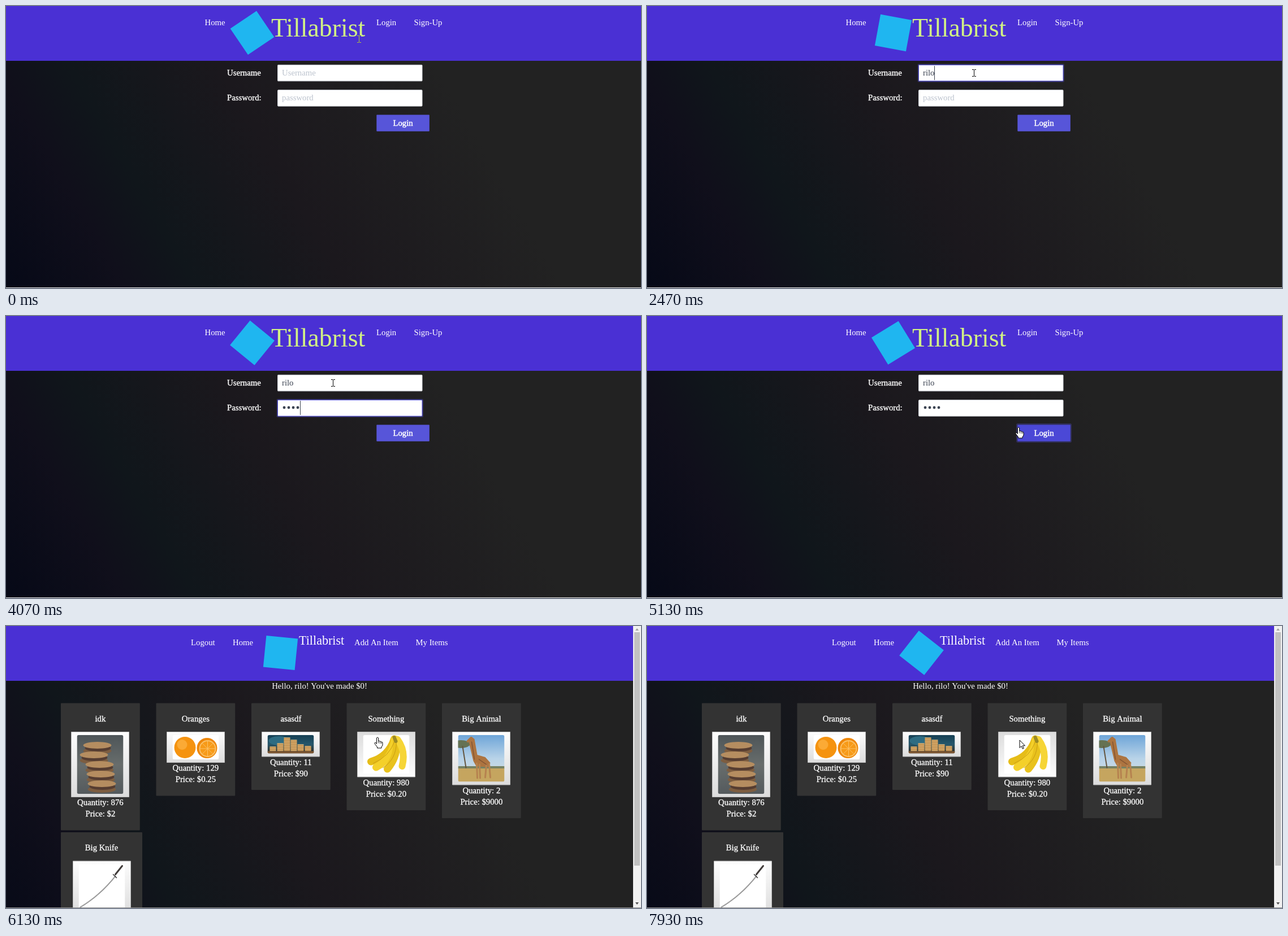
Animation of 1123 by 499 pixels, one loop 8 s. Source, as an HTML page with a canvas:

```html
<!DOCTYPE html>
<html lang="en">
<head>
<meta charset="utf-8">
<title>Marketplace login</title>
<style>
html, body { margin: 0; width: 100%; height: 100%; overflow: hidden; background: #222; }
canvas { display: block; }
</style>
</head>
<body>
<canvas id="stage" width="1123" height="499"></canvas>
<script>
const ctx = document.getElementById('stage').getContext('2d');
const W = 1123, H = 499, LOOP = 8000;
const SERIF = '"Liberation Serif", "Times New Roman", serif';
const BRAND = 'Tillabrist', USER = 'rilo';
const FOCUS_NAME = 1130, FOCUS_PASS = 2930, PRESS = 5070, PAGE = 5470, LOADED = 5930;
const NAME_KEYS = [1930, 2070, 2140, 2270];
const PASS_KEYS = [3600, 3730, 3800, 3930];
const POINTER = [
  [0, 624, 58], [270, 624, 58], [800, 578, 118], [4200, 578, 118],
  [4380, 606, 152], [4800, 657, 197], [6200, 657, 197], [6700, 662, 43],
  [7250, 662, 43], [7700, 659, 202], [LOOP, 659, 202]
];
const HAND = new Path2D('M-1.6 1Q0-1.2 1.6 1V6.5Q3.2 5.6 4.3 7.2Q6 6.5 6.8 8.2Q9 7.8 9 10V14L7 17V19H-.5V17L-4.8 11.5Q-5.6 9.6-4.2 9.2Q-3 9-1.6 11.5Z');
const ARROW = new Path2D('M0 0V13.5L3.1 10.6L5.2 15.3L7.3 14.4L5.2 9.8H9.5Z');

function box(x, y, w, h, fill, r = 0, line) {
  ctx.beginPath();
  ctx.roundRect(x, y, w, h, r);
  if (fill) { ctx.fillStyle = fill; ctx.fill(); }
  if (line) { ctx.strokeStyle = line; ctx.lineWidth = 1; ctx.stroke(); }
}

function text(s, x, y, { size = 14.75, color = '#fff', align = 'left', heavy = 0, font = SERIF } = {}) {
  ctx.font = `${size}px ${font}`;
  ctx.textAlign = align;
  ctx.fillStyle = color;
  ctx.fillText(s, x, y);
  if (heavy) {
    ctx.strokeStyle = color;
    ctx.lineWidth = heavy;
    ctx.strokeText(s, x, y);
  }
}

function poly(points, fill) {
  ctx.beginPath();
  for (let i = 0; i < points.length; i += 2) ctx.lineTo(points[i], points[i + 1]);
  ctx.fillStyle = fill;
  ctx.fill();
}

function disc(x, y, rx, fill, ry = rx) {
  ctx.beginPath();
  ctx.ellipse(x, y, rx, ry, 0, 0, 7);
  ctx.fillStyle = fill;
  ctx.fill();
}

function stroke(path, color, width) {
  ctx.strokeStyle = color;
  ctx.lineWidth = width;
  ctx.lineCap = 'round';
  ctx.stroke(new Path2D(path));
}

function vertical(y, h, ...colors) {
  const g = ctx.createLinearGradient(0, y, 0, y + h);
  colors.forEach((c, i) => g.addColorStop(i / (colors.length - 1), c));
  return g;
}

function backdrop(w, h) {
  const a = Math.PI / 3, sin = Math.sin(a), cos = Math.cos(a);
  const half = (w * sin + h * cos) / 2, dx = half * sin, dy = half * cos;
  const g = ctx.createLinearGradient(w / 2 - dx, h / 2 + dy, w / 2 + dx, h / 2 - dy);
  const stops = [[0, '#060917'], [.15, '#100f1b'], [.24, '#10161b'], [.43, '#1b181d'], [.7, '#222222']];
  for (const [p, c] of stops) g.addColorStop(p, c);
  box(0, 0, W, H, g);
  box(0, 0, w, 97, '#4a30d4');
}

function emblem(x, degrees) {
  ctx.save();
  ctx.translate(x, 47.5);
  ctx.rotate((degrees + 45) * Math.PI / 180);
  box(-28, -28, 56, 56, '#1fb6f0');
  ctx.restore();
}

function pointerAt(t) {
  const i = POINTER.findIndex(k => k[0] > t);
  const [t0, x0, y0] = POINTER[i - 1], [t1, x1, y1] = POINTER[i];
  const p = (t - t0) / (t1 - t0), e = p * p * (3 - 2 * p);
  return [x0 + (x1 - x0) * e, y0 + (y1 - y0) * e];
}

const inside = ([px, py], x, y, w, h) => px >= x && px <= x + w && py >= y && py <= y + h;
const typed = (keys, t) => keys.filter(k => k <= t).length;

function drawPointer(kind, [x, y]) {
  ctx.save();
  ctx.translate(Math.round(x), Math.round(y));
  if (kind === 'beam') {
    // Inverts whatever lies below it.
    ctx.globalCompositeOperation = 'difference';
    box(0, -5, 1, 11, '#fff');
    for (const end of [-6, 6]) {
      box(-3, end, 3, 1, '#fff');
      box(1, end, 3, 1, '#fff');
    }
  } else {
    const shape = kind === 'hand' ? HAND : ARROW;
    ctx.fillStyle = '#fff';
    ctx.fill(shape);
    ctx.strokeStyle = '#000';
    ctx.lineWidth = 1;
    ctx.stroke(shape);
    if (kind === 'hand') stroke('M1.6 7V10M4.3 8V10.5M6.8 9V11', '#000', .8);
  }
  ctx.restore();
}

function field(y, hint, focused) {
  if (focused) box(478.5, y - 1.5, 259.5, 32.5, 'rgba(87,85,217,.3)', 2);
  box(480.5, y + .5, 255.5, 28.5, '#fff', 1, focused ? '#5755d9' : '#d5d9e0');
  if (hint) text(hint, 488, y + 19, { color: '#bcc3ce' });
}

function caret(x, y, t, since) {
  if ((t - since) % 1060 < 530) box(Math.round(x), y, 1, 25, '#3b4351');
}

function loginPage(t, pointer) {
  backdrop(W, H);
  emblem(435.5, 11 + .018 * t);
  text('Home', 351.5, 34);
  text('Login', 655, 34);
  text('Sign-Up', 721.5, 34);
  text(BRAND, 469, 54, { size: 45.8, color: '#d2f285' });

  const n = typed(NAME_KEYS, t), p = typed(PASS_KEYS, t);
  const onName = t >= FOCUS_NAME && t < FOCUS_PASS;
  const onPass = t >= FOCUS_PASS && t < PRESS;
  text('Username', 391, 123, { heavy: .35 });
  text('Password:', 391, 167, { heavy: .35 });
  field(103.8, n ? '' : 'Username', onName);
  field(148.2, p ? '' : 'password', onPass);

  const value = USER.slice(0, n);
  text(value, 488, 123, { color: '#3b4351' });
  if (onName) caret(488 + ctx.measureText(value).width, 106, t, n ? NAME_KEYS[n - 1] : FOCUS_NAME);
  for (let i = 0; i < p; i++) disc(492 + 8 * i, 162, 2.4, '#3b4351');
  if (onPass) caret(488 + 8 * p, 150, t, p ? PASS_KEYS[p - 1] : FOCUS_PASS);

  const hover = inside(pointer, 655, 192, 94, 30);
  if (t >= PRESS) box(653, 190, 98, 34, 'rgba(87,85,217,.3)', 3);
  box(655.3, 192.4, 93.5, 29.4, hover ? '#4b48d6' : '#5755d9', 1);
  text('Login', 702, 211.5, { align: 'center', heavy: .5 });
  box(0, 498, W, 1, '#e8e8e8');
  drawPointer(hover ? 'hand' : 'beam', pointer);
}

// Each picture is drawn in an 82-wide box of the given height.
const art = {
  cookies(h) {
    box(0, 0, 82, h, vertical(0, h, '#4e5558', '#686d6c', '#545a5d'));
    for (let i = 0; i < 5; i++) {
      const x = 40 + [-4, -10, 0, 2, 4][i], y = 20 + i * 17;
      disc(x, y + 8, 25, '#7d5d40', 6);
      disc(x + 1, y + 3, 23, '#563d31', 6);
      disc(x, y - 2, 25, '#b58d60', 6);
    }
  },
  oranges(h) {
    box(0, 0, 82, h, '#fff');
    disc(22, 22, 19, '#f5930f');
    disc(17, 17, 9, '#fbaa35');
    disc(61, 23, 18, '#ee8708');
    disc(62, 24, 15, '#fbc168');
    disc(62, 24, 13, '#f79a17');
    stroke('M49 24H75M62 11V37M53 15L71 33M53 33L71 15', '#fbc168', 1);
  },
  coins(h) {
    box(0, 0, 82, h, vertical(0, h, '#163f53', '#26576b', '#34261b'));
    disc(20, 10, 18, '#2e6c82', 8);
    [[9, 8], [22, 14], [34, 24], [46, 20], [58, 12], [71, 9]].forEach(([x, n]) => {
      box(x - 5, h - 4 - n, 11, n, '#b98544', 1);
      for (let y = 0; y < n; y += 3) box(x - 5, h - 4 - n + y, 11, 1, '#f0ce91');
    });
    box(0, h - 4, 82, 4, '#7b5632');
  },
  bananas(h) {
    box(0, 0, 82, h, '#fff');
    stroke('M55 7Q45 38 14 47', '#e6bd18', 13);
    stroke('M56 8Q51 42 23 57', '#f4d02a', 13);
    stroke('M59 8Q62 38 43 60', '#e9c21d', 13);
    stroke('M61 8Q76 28 69 55', '#f6d536', 12);
    stroke('M56 10Q47 38 18 50M59 12Q59 43 35 58', '#c99c14', 1);
    stroke('M55 4L58 11', '#9b8a25', 6);
  },
  giraffe(h) {
    box(0, 0, 82, h, vertical(0, h, '#6ea5d8', '#b8d3e8', '#d9e0df'));
    box(0, 58, 82, h - 58, '#c5a55f');
    box(0, 55, 82, 4, '#778263');
    disc(5, 16, 16, '#657253', 7);
    stroke('M8 20L14 58', '#645540', 2);
    poly([18, 8, 24, 3, 29, 7, 34, 35, 48, 39, 57, 49, 55, 57, 32, 55, 27, 46], '#ad7440');
    stroke('M23 5L17 11', '#ad7440', 4);
    stroke('M33 50L34 76M38 52L39 76M50 53L48 75M55 51L57 75', '#b6824f', 3);
    stroke('M24 12L29 43M37 43L50 52', '#805333', 1.5);
  },
  knife(h) {
    box(0, 0, 82, h, '#fff');
    stroke('M3 76Q38 55 65 21', '#777', 2);
    stroke('M3 76Q38 55 65 21', '#cfcfcf', .7);
    stroke('M65 18L77 3', '#413c3a', 3);
    stroke('M61 18L67 24', '#333', 1.5);
  }
};

const ITEMS = [
  { name: 'idk', qty: 876, price: '2', h: 116, pic: 'cookies', slow: true },
  { name: 'Oranges', qty: 129, price: '0.25', h: 55, pic: 'oranges', slow: true },
  { name: 'asasdf', qty: 11, price: '90', h: 44.5, pic: 'coins' },
  { name: 'Something', qty: 980, price: '0.20', h: 80.5, pic: 'bananas' },
  { name: 'Big Animal', qty: 2, price: '9000', h: 94.5, pic: 'giraffe' },
  { name: 'Big Knife', qty: 1, price: '50', h: 95, pic: 'knife' }
];

function card(item, x, y, w, empty, pointer) {
  const th = empty ? 24 : item.h, tw = empty ? 22 : 103;
  const mid = x + w / 2, tx = Math.round(mid - tw / 2), ty = y + 50.5;
  const label = { align: 'center', heavy: .3 };
  box(x, y, w, th + 109, '#333', 1);
  text(item.name, mid, y + 32, label);
  const tones = ['#fdfdfd', '#dcdcdc'];
  if (inside(pointer, tx, ty, tw, th)) tones.reverse();
  box(tx + .5, ty + .5, tw - 1, th - 1, vertical(ty, th, ...tones), 0, '#bdbdbd');
  if (!empty) {
    ctx.save();
    ctx.translate(tx + 10.5, ty + 6);
    ctx.beginPath();
    ctx.roundRect(0, 0, 82, th - 12, 3);
    ctx.clip();
    art[item.pic](th - 12);
    ctx.restore();
  }
  text('Quantity: ' + item.qty, mid, ty + th + 14, label);
  text('Price: $' + item.price, mid, ty + th + 34, label);
}

function scrollbar(end) {
  box(1109, 0, 14, H, '#f1f1f1');
  box(1111, 11, 10, end - 11, '#c1c1c1');
  poly([1113, 8, 1119, 8, 1116, 4], '#a3a3a3');
  poly([1113, 489, 1119, 489, 1116, 493], '#505050');
}

function shopPage(t, pointer) {
  const loaded = t >= LOADED;
  backdrop(1109, 570);
  emblem(485.5, 30.3 + .018 * t);
  if (inside(pointer, 608, 9, 94, 41)) box(607.5, 9, 94.5, 41, '#320037', 8);
  text('Logout', 327, 34);
  text('Home', 401, 34);
  text('Add An Item', 616, 34);
  text('My Items', 724.5, 34);
  text(BRAND, 518, 33, { size: 22.1 });
  text(`Hello, ${USER}! You've made $0!`, 554.5, 111, { align: 'center' });

  let x = 97;
  ITEMS.slice(0, 5).forEach(item => {
    const empty = item.slow && !loaded, w = empty ? 117 : 139.75;
    card(item, x, 136.5, w, empty, pointer);
    x += w + 28.75;
  });
  card(ITEMS[5], 97, loaded ? 365 : 344, 144, false, pointer);

  scrollbar(loaded ? 424 : 438);
  box(0, 498, W, 1, '#8c8c8c');
  if (!loaded || (t >= 7200 && t < 7600)) {
    box(0, 481, 372.5, 18, '#fff', [0, 3, 0, 0]);
    text('Connecting...', 4, 493.5, { size: 9.8, color: '#777', font: '"Open Sans", "Noto Sans", sans-serif' });
  }
  drawPointer(t < 7250 ? 'hand' : 'arrow', pointer);
}

function frame(now) {
  const t = Math.max(0, now) % LOOP, pointer = pointerAt(t);
  (t < PAGE ? loginPage : shopPage)(t, pointer);
  requestAnimationFrame(frame);
}

requestAnimationFrame(frame);
</script>
</body>
</html>
```
